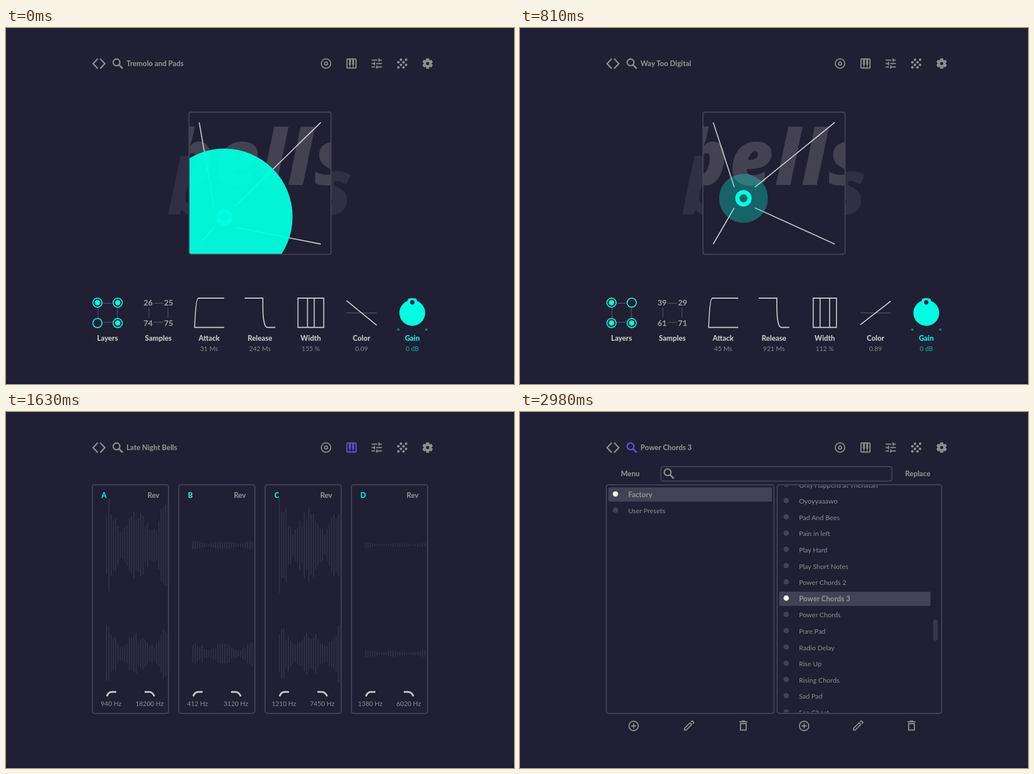
Animation of 894 by 626 pixels, one loop 3.25 s. Source, as an HTML page:

```html
<!DOCTYPE html>
<html lang="en">
<head>
<meta charset="utf-8">
<title>Sampler interface</title>
<style>
html, body { margin: 0; width: 100%; height: 100%; overflow: hidden; background: #201f34; }
svg { display: block; width: 894px; height: 626px; font-family: Lato, "Open Sans", sans-serif; font-size: 11.4px; }
.scene { visibility: hidden; animation: 3250ms step-end infinite; }
.bold { font-weight: 800; font-size: 12.7px; }
.num { font-weight: 800; font-size: 14px; }
.item { font-size: 11.9px; }
.big { font: italic 800 134px "Open Sans", sans-serif; letter-spacing: 3px; }
</style>
</head>
<body>
<svg id="stage" viewBox="0 0 894 626">
  <defs>
    <clipPath id="pad"><rect x="322" y="148" width="250" height="250" rx="4"/></clipPath>
    <clipPath id="list"><rect x="453" y="129.5" width="288" height="398.5"/></clipPath>
  </defs>
</svg>
<script>
const BG = '#201f34', CYAN = '#00ffe0', GREY = '#8f8d90', PALE = '#cac8c8', EDGE = '#434156', PURPLE = '#6b51d6';

const text = (x, y, s, fill = GREY, cls = '', anchor = 'middle', op = 1) =>
  `<text x="${x}" y="${y}" fill="${fill}" class="${cls}" text-anchor="${anchor}" opacity="${op}">${s}</text>`;
const path = (d, color = PALE, w = 1.8, op = 1) =>
  `<path d="${d}" fill="none" stroke="${color}" stroke-width="${w}" opacity="${op}"/>`;
const shape = (d, fill, op = 1) => `<path d="${d}" fill="${fill}" opacity="${op}"/>`;
const dot = (x, y, r, fill, op = 1) => `<circle cx="${x}" cy="${y}" r="${r}" fill="${fill}" opacity="${op}"/>`;
const ring = (x, y, r, color, w = 1.8) =>
  `<circle cx="${x}" cy="${y}" r="${r}" fill="none" stroke="${color}" stroke-width="${w}"/>`;
const frame = (x, y, w, h, color = EDGE, fill = 'none', rx = 4, sw = 2) =>
  `<rect x="${x}" y="${y}" width="${w}" height="${h}" rx="${rx}" fill="${fill}" stroke="${color}" stroke-width="${sw}"/>`;
const bar = (x, y, w, h, fill, rx = 2) => `<rect x="${x}" y="${y}" width="${w}" height="${h}" rx="${rx}" fill="${fill}"/>`;
const at = (x, y, body, turn = 0) => `<g transform="translate(${x} ${y}) rotate(${turn})">${body}</g>`;
const group = (op, body) => `<g opacity="${op}">${body}</g>`;
const each = (n, f) => Array.from({ length: n }, (_, i) => f(i)).join('');
const labelled = (x, y, label, value, color, valueColor = color, op = .65) =>
  text(x, y, label, color, 'bold') + text(x, y + 17.7, value, valueColor, '', 'middle', op);

let seed = 7;
const random = () => (seed = (seed * 16807) % 2147483647) / 2147483647;

function magnifier(x, y, color) {
  return ring(x - 2.2, y - 2.3, 5.9, color, 2.3) + path(`M${x + 2} ${y + 2}l6.6 6.6`, color, 2.8);
}

function header(name, lit = '') {
  const tint = key => lit.includes(key) ? PURPLE : GREY;
  const [piano, grain, gear] = ['k', 'g', 's'].map(tint);
  return path('M161.5 54l-8.2 8.7 8.2 8.7M165.7 54l8.2 8.7-8.2 8.7', GREY, 2.5) +
    magnifier(196.7, 62.7, tint('f')) +
    text(212, 67, name, GREY, 'bold', 'start') +
    ring(563.2, 62.5, 8.3, tint('t'), 1.9) + ring(563.2, 62.5, 2.7, tint('t'), 1.9) +
    frame(600, 54.5, 16, 16, piano, 'none', 1.5, 2) +
    path('M605.3 55v10M611 55v10', piano, 3.4) + path('M605.3 64v6M611 64v6', piano, 1.4) +
    at(640.5, 50.5, shape('M3 17v2h6v-2zM3 5v2h10V5zm10 16v-2h8v-2h-8v-2h-2v6zM7 9v2H3v2h4v2h2V9zm14 4v-2H11v2zm-6-4h2V7h4V5h-4V3h-2v6z', tint('m'))) +
    [[-6, -2], [-6, 6], [-2, -6], [-2, 2], [2, -2], [2, 6], [6, -6], [6, 2]]
      .map(([x, y]) => dot(697.3 + x * 1.13, 62.5 + y * 1.13, 2.25, grain)).join('') +
    ring(742, 62.5, 5, gear, 4.6) +
    each(6, i => at(742, 62.5, bar(-2.7, -9.2, 5.4, 4, gear, .8), i * 60));
}

function knob(x, y, turn, color = CYAN) {
  return at(x, y, dot(0, 0, 22.7, color) +
      shape('M-8.5-20L-7.5-24Q-7-25.6-5-25.6Q0-26.4 5-25.6Q7-25.6 7.5-24L8.5-20Z', color) +
      dot(0, -18.6, 3.8, BG), turn) +
    dot(x - 24.6, y + 29.3, 2.1, color, .45) + dot(x + 24.6, y + 29.3, 2.1, color, .45);
}

function controls(c) {
  const column = i => 178.7 + i * 89.4;
  const corner = i => [161 + (i % 2) * 35.6, 483 + (i >> 1) * 35.8];
  const outer = 14.6 + .0525 * c.width, inner = 14.6 - .056 * c.width, tilt = (.5 - c.color) * 53;
  const foot = c.release < 100 ? 457 : 460;
  const values = ['', '', c.attack + ' Ms', c.release + ' Ms', c.width + ' %', c.color];
  return path('M170 484h18M170 517.5h18M162 492v18M196 492v18M260 484h17M260 517.5h17M251.5 492v17M285 492v17', EDGE) +
    each(4, i => {
      const [x, y] = corner(i);
      return ring(x, y, 8.1, CYAN) + (c.layers[i] === '1' ? dot(x, y, 4.7, CYAN) : '') +
        text(250 + (i % 2) * 36, y + 5.3, c.samples[i], '#9a989b', 'num');
    }) +
    path('M384 475H338.5C335 475 333 500 332 526.5H384') +
    path(`M420 475H452V488C452 513 ${foot - 5} 526.5 ${foot} 526.5H474`) +
    path(`M${536.5 - outer} 475h${2 * outer}v51.5h${-2 * outer}zM${536.5 - inner} 475v51.5M${536.5 + inner} 475v51.5`) +
    path('M599 501h53.5', EDGE) + path(`M599 ${501 - tilt}L652.5 ${501 + tilt}`) +
    ['Layers', 'Samples', 'Attack', 'Release', 'Width', 'Color']
      .map((s, i) => labelled(column(i), 550.3, s, values[i], PALE, GREY, .95)).join('') +
    knob(715, 501, c.gain * 4.15) + labelled(715, 550.3, 'Gain', c.gain + ' dB', CYAN);
}

const word = (y, fill) => text(284, y, 'bells', fill, 'big', 'start');

function padPage(p) {
  const [x, y] = p.at, [dx, dy] = p.skew || [0, 0];
  const rays = [[340, 166, -1, -1], [554, 166, 1, -1], [340, 380, -1, 1], [554, 380, 1, 1]]
    .map(([a, b, sx, sy]) => `M${a} ${b}L${x + dx + 18.2 * sx} ${y + dy + 18.2 * sy}`).join('');
  return header(p.name, p.lit) + word(327.5, '#302f43') + frame(322, 148, 250, 250, EDGE, BG) +
    `<g clip-path="url(#pad)">${word(275.5, '#444153')}${path(rays, PALE)}${dot(x, y, p.r, CYAN, .3 + .0085 * (p.r - 43))}</g>` +
    frame(322, 148, 250, 250) + ring(x, y, 10.8, CYAN, 7.3) + group(p.rowOpacity || 1, controls(p));
}

function modPage(p) {
  const column = (x, title, rows) =>
    dot(x - 41, 168.3, 4.8, CYAN) + text(x, 174, title, '#0f9a90', 'bold') +
    rows.map(([a, b], i) => labelled(x, 261.8 + i * 49.1, a, b, CYAN)).join('');
  const spikes = [476, 486, 498, 510.5, 523, 528.5, 540].map((x, i) => {
    const top = [198, 192, 192, 192, 192, 200, 192][i], w = i ? 6 : 3;
    return `M${x - w} 228Q${x - 2} ${top} ${x} ${top}Q${x + 2} ${top} ${x + 6} 228Z`;
  }).join('');
  return header(p.name, 't') + word(327.5, '#302f43') + frame(322, 148, 250, 250, EDGE, BG) +
    path('M447 148v250', EDGE, 2) +
    column(384, 'Zapper', p.zapper) + column(510, 'Vibrato', p.vibrato) +
    shape('M350 225L360 194V225Z', '#3f4655') + path('M403 225H350L360 194C361 214 369 225 387 225', CYAN, 1.8, .33) +
    shape(spikes, '#1a4551') + controls(p);
}

const filterIcons = (x, color) =>
  path(`M${x + 25.5} 500Q${x + 28} 492.3 ${x + 34} 492.3H${x + 42}M${x + 92} 492.3H${x + 100}Q${x + 106} 492.3 ${x + 109} 500`, color, 3);

function wave(x, y, peak) {
  return path(each(28, i => {
    const u = i / 27, swell = Math.abs(Math.cos(2 * Math.PI * u)) ** 1.5 * (.6 + .4 * Math.abs(Math.cos(Math.PI * u)));
    const a = peak * (.25 + .55 * swell) * (.7 + .5 * random());
    return `M${x + i * 4} ${y - a}v${2 * a}`;
  }), '#35344a', 1.6);
}

function samplePage(name, lit, cuts, knobs) {
  const rows = [['Gain', ' dB', CYAN, 4.15], ['Pan', '', '#439493', 1.39], ['Tune', ' St', '#265f72', 6]];
  seed = 7;
  return header(name, lit) + each(4, i => {
    const x = 152 + 152 * i;
    return frame(x, 128, 134, 402) +
      wave(x + 25, 234, [90, 10, 92, 5][i]) + wave(x + 25, 425, [52, 26, 54, 8][i]) +
      text(x + 20.5, 151, 'ABCD'[i], CYAN, 'bold') + text(x + 107.5, 151, 'Rev', GREY, 'bold') +
      (knobs ? rows.map(([label, unit, color, rate], r) =>
        knob(x + 67, 190.3 + r * 108.7, knobs[i][r] * rate, color) +
        labelled(x + 67, 240 + r * 108.7, label, knobs[i][r] + unit, color)).join('') : '') +
      filterIcons(x, PALE) + text(x + 33, 517, cuts[i][0] + ' Hz') + text(x + 100.5, 517, cuts[i][1] + ' Hz');
  });
}

// Dims the drawing above a level given as a percentage of its height.
function meter(body, top, bottom, value) {
  const y = bottom - (bottom - top) * parseFloat(value) / 100, id = `level${top}-${parseFloat(value)}`;
  return `<clipPath id="${id}"><rect x="150" y="${y}" width="600" height="200"/></clipPath>` +
    group(.6, body) + `<g clip-path="url(#${id})">${body}</g>`;
}

const art = [
  (c, p, v) => meter(path('M197 243V178A22.5 20.5 0 0 1 242 178V243M206 241V182Q206 174.5 213 174.5H217M221 174.5H225Q232 174.5 232 182V241M206 189H232M206 220.5H232M215 226v8M223.5 226v8M206 254v7M214.5 254v7M223.5 254v7M232 254v7', c) +
    `<path d="M215 177V218M223.5 177V218" stroke="${c}" stroke-width="1.8" stroke-dasharray="2 3"/>` +
    shape('M196 241H243V243Q241 254 229 254H210Q198 254 196 243Z', c), 157, 261, v),
  c => path('M321 258V249L348.5 235.5V231Q353 227 354 222V213Q348 207 348 197V184Q348 173 353 169Q363 160 376 156V161Q384 162 389 167Q394 172 394 182V197Q394 207 388 213V224Q389 228 393.5 231V235.5L421.5 249V258', c) +
    dot(342.5, 198, 11, c) + dot(399, 198, 11, c),
  (c, p) => path('M480 157L510 214M568 157L537 214M480 263L510 229M568 263L537 229M510 214H537V229H510Z', EDGE, 1.3) +
    frame(524 - p.room, 220.5 - p.room, 2 * p.room, 2 * p.room, c, 'none', 0),
  c => path('M630 165L720 255M720 165L630 255', EDGE, 1.3) +
    [[676, 192], [658, 211], [693, 210], [677, 229]].map(([x, y]) => each(90, () => {
      const a = random() * 6.28, r = 12 * random();
      return dot(x + Math.cos(a) * r, y + Math.sin(a) * r, 1, c);
    })).join(''),
  (c, p, v) => meter(path('M173.5 440V413.5A46 46 0 0 1 265.5 413.5V440L248 453Q245 455 245 458V464Q245 471 239.5 471T234 464V461Q234 459 231.5 459T229 461V464Q229 467.5 226.5 467.5T224 464V461Q224 459 221.5 459T219 461V464Q219 467.5 216.5 467.5T214 464V461Q214 459 211.5 459T209 461V464Q209 467.5 207 467.5T205 464Q205 471 199.5 471T194 464V458Q194 455 191 453Z', c) +
    ring(200.5, 424.3, 12.8, c) + ring(237.7, 424.3, 12.8, c) + path('M219 435L212.5 446H225.5Z', c), 367, 471, v),
  (c, p) => path('M326 421.3H416', c) + path(`M326 ${p.low}C346 ${p.low - 2} 354 424 362 415S376 403.5 384 404.5S400 410 406 409S412 406 415 403.5V408.5`, c),
  (c, p, v) => meter(frame(484, 378, 83, 83, c, 'none', 0, 1.8), 368, 470, v),
  (c, p) => path('M630 421.3H720', c) + path(`M630 466L${p.cut} 417.5H681M669 424.8H704L720 473`, c)
];

function fxPage(p) {
  const colors = ['#ff9043', '#ffb83d', '#3fb9ff', '#00f2d0', '#6c45f0', '#4468ff', '#b43cf5', '#ff4060'];
  const labels = ['Drive', 'Time Delay', 'Room Reverb', 'Time Panner', '8-bit', 'Low Mid Hi', 'Compressor', ''];
  const columns = { 1: [66], 2: [33, 100.5], 3: [26, 68, 110] };
  seed = 11;
  return header(p.name, 'g') + each(8, i => {
    const x = 152 + 152 * (i % 4), y = i < 4 ? 128 : 338, c = colors[i], values = p.values[i];
    return frame(x, y, 134, 192) + dot(x + 20.5, y + 18.8, 4.7, c) + art[i](c, p, values[0]) +
      (i === 7 ? filterIcons(x, c) : '') +
      values.map((v, k) => labelled(x + columns[values.length][k], y + 161, labels[i].split(' ')[k] || '', v, c)).join('');
  });
}

const presets = ['Only Happens at Thehatan', 'Oyoyyaaawo', 'Pad And Bees', 'Pain in left', 'Play Hard', 'Play Short Notes',
  'Power Chords 2', 'Power Chords 3', 'Power Chords', 'Pure Pad', 'Radio Delay', 'Rise Up', 'Rising Chords', 'Sad Pad', 'Sea Ghost'];

function browserPage(name, shift) {
  const row = (x, y, s, on) => dot(x, y - 1.3, 4.7, on ? '#fff' : EDGE) +
    text(x + 22.4, y + 4.2, s, GREY, on ? 'bold' : 'item', 'start');
  const tools = [[200, 297, 393], [500, 594.5, 689]].map(([a, b, c]) =>
    ring(a, 552, 8.3, GREY, 1.9) + path(`M${a - 4.5} 552h9M${a} 547.5v9`, GREY, 1.9) +
    path(`M${b - 7.6} 559.3v-3l9.8-9.8 3 3-9.8 9.8zM${b + 4} 545l2-2 3 3-2 2`, GREY, 1.9) +
    path(`M${c - 7} 544.7h14M${c - 3} 543.6h6M${c - 5} 548h10v11.2h-10z`, GREY, 2)).join('');
  return header(name, 'f') + text(194, 113, 'Menu', GREY, 'bold') + text(700, 113, 'Replace', GREY, 'bold') +
    frame(248, 96, 406.5, 25.5) + magnifier(262, 108.3, GREY) +
    frame(152, 128, 295, 402) + frame(452.5, 128, 289.5, 402) +
    bar(155.5, 132.5, 288, 25, EDGE) + row(168, 145.4, 'Factory', true) + row(168, 174, 'User Presets') +
    `<g clip-path="url(#list)">${presets.map((s, i) => {
      const y = 128.4 + i * 28.6 + shift, on = s === name;
      return (on ? bar(456, y - 12.6, 266.5, 25, EDGE) : '') + row(468.5, y, s, on);
    }).join('')}</g>` + bar(727, 365 - shift / 10, 8.6, 37, '#38364b', 4) + tools;
}

const digital = { name: 'Way Too Digital', layers: '1011', samples: [39, 29, 61, 71], attack: 45, release: 921, width: 112, color: .89, gain: 0, skew: [2, -1.5] };
const drift = (x, y, r) => padPage({ ...digital, at: [x, y], r });

const scenes = [
  [0, padPage({ name: 'Tremolo and Pads', at: [384.3, 332], r: 120, layers: '1101', samples: [26, 25, 74, 75], attack: 31, release: 242, width: 155, color: .09, gain: 0 })],
  [270, padPage({ name: 'Too Much Drink', at: [511.3, 312], r: 72, skew: [2.5, -2], layers: '1111', samples: [34, 76, 66, 24], attack: 30, release: 956, width: 56, color: .15, gain: 0 })],
  [540, padPage({ name: 'Slow Morning Keys', lit: 'm', at: [452, 306], r: 58, layers: '1110', samples: [36, 52, 64, 48], attack: 38, release: 938, width: 84, color: .52, gain: 0, rowOpacity: .5 })],
  [810, drift(393.3, 299.5, 43)],
  [880, drift(399, 296, 45)],
  [950, drift(407, 291, 48)],
  [1020, drift(417, 285, 51)],
  [1090, modPage({ name: 'Glass Over Water', zapper: [['Pitch', '12 St'], ['Rise', '1480 Ms'], ['Fall', '367 Ms']], vibrato: [['Pitch', '1 St'], ['Speed', '4 Hz'], ['Mix', '80 %']],
    layers: '1011', samples: [48, 40, 65, 35], attack: 33, release: 476, width: 136, color: .64, gain: 0 })],
  [1360, modPage({ name: 'What you Get From Quorv LOL', zapper: [['Pitch', '21 St'], ['Rise', '3125 Ms'], ['Fall', '367 Ms']], vibrato: [['Pitch', '1 St'], ['Speed', '6 Hz'], ['Mix', '100 %']],
    layers: '1100', samples: [58, 50, 68, 0], attack: 22, release: 32, width: 160, color: .39, gain: 2 })],
  [1630, samplePage('Late Night Bells', 'k', [[940, 18200], [412, 3120], [1210, 7450], [1380, 6020]])],
  [1900, samplePage('Lets Goo', 'km', [[1218, 19448], [387, 2732], [1458, 6931], [1626, 5401]],
    [[2, -25, 0], [-12, 49, -12], [11, -2, 12], [-7, 18, -12]])],
  [2170, fxPage({ name: 'Wide and Broken', room: 23, low: 432, cut: 650,
    values: [['48 %'], ['1/4', '22 %'], ['62 %', '41 %'], ['1/2', '70 %'], ['30 %'], ['-6 dB', '7 dB', '6 dB'], ['52 %'], ['240 Hz', '6120 Hz']] })],
  [2440, fxPage({ name: 'Move XY Around on This Preset', room: 18, low: 440, cut: 646,
    values: [['64 %'], ['1/2t', '34 %'], ['86 %', '27 %'], ['1/4t', '85 %'], ['45 %'], ['-10 dB', '7 dB', '8 dB'], ['69 %'], ['180 Hz', '5393 Hz']] })],
  [2710, browserPage('Pure Pad', 10)],
  [2980, browserPage('Power Chords 3', 0)]
];

const percent = ms => (ms / 32.5).toFixed(4) + '%';
const stage = document.getElementById('stage');
const style = document.createElement('style');
stage.innerHTML += scenes.map(([, body], i) => `<g class="scene" style="animation-name:show${i}">${body}</g>`).join('') +
  bar(0, 622, 894, 4, '#1b1a2e', 0);
style.textContent = scenes.map(([start], i) => {
  const end = i + 1 < scenes.length ? scenes[i + 1][0] : 3250;
  return `@keyframes show${i}{0%{visibility:hidden}${percent(start)}{visibility:visible}${percent(end)}{visibility:hidden}}`;
}).join('');
document.head.append(style);
</script>
</body>
</html>
```
